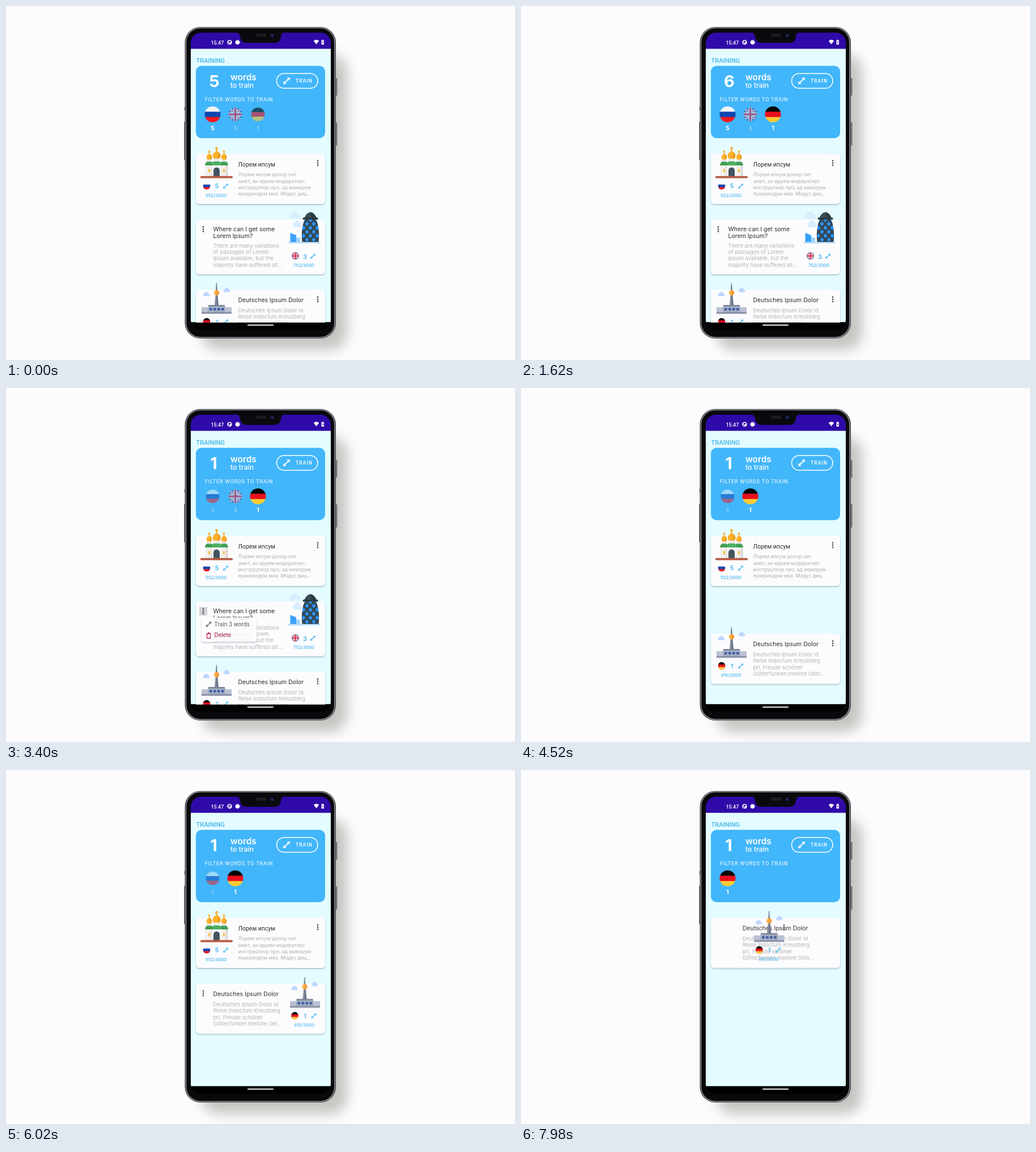
Animation of 898 by 624 pixels, one loop 8000 ms. Source, as an HTML page:

```html
<!DOCTYPE html>
<html lang="en">
<head>
<meta charset="utf-8">
<title>Training screen</title>
<style>
html, body { margin: 0; width: 100%; height: 100%; overflow: hidden; background: #fcfcfe; }
svg { display: block; width: 898px; height: 624px; }
text { font-family: Inter, sans-serif; }
.roboto { font-family: Roboto, sans-serif; }
.mid { text-anchor: middle; }
.title { font-size: 10.5px; fill: #2c2c32; }
.body { font-size: 9.5px; fill: #b2b2b6; }
.body.roboto { font-size: 9.2px; }
.accent { fill: #45b5ee; font-size: 7.8px; font-weight: 500; text-anchor: middle; }
.accent.count { font-size: 11px; font-weight: 600; }
.big { font-size: 29px; font-weight: 700; }
.pick { font-size: 10.5px; font-weight: 700; text-anchor: middle; }

/* One 8 s timeline drives every part */
.anim, .flip, .pick.ru, .pick.de { animation: 8s ease-in-out infinite; }
.pick.uk { transform: scale(.86); opacity: .6; font-weight: 400; }
.pick.ru { animation-name: unpick; }
.pick.de { animation-name: pick; }
.flip { animation-name: flip; }
.five { animation-name: five; animation-timing-function: step-end; }
.six { animation-name: six; animation-timing-function: step-end; }
.one { animation-name: one; animation-timing-function: step-end; }
.long { animation-name: long; animation-timing-function: step-end; }
.short { animation-name: short; animation-timing-function: step-end; }
.slot-ru { animation-name: slotRu; }
.slot-uk { animation-name: slotUk; }
.slot-de { animation-name: slotDe; }
.card-ru { animation-name: cardRu; }
.card-uk { animation-name: cardUk; }
.card-de { animation-name: cardDe; }
.menu-uk { animation-name: menuUk; }
.menu-ru { animation-name: menuRu; }
.press-uk { animation-name: pressUk; }
.press-ru { animation-name: pressRu; }

@keyframes pick {
  0%, 12.5% { transform: scale(.86); opacity: .6; font-weight: 400; }
  14.4%, 100% { transform: none; opacity: 1; font-weight: 700; }
}
@keyframes unpick {
  0%, 28.75% { transform: none; opacity: 1; font-weight: 700; }
  30.6%, 100% { transform: scale(.86); opacity: .52; font-weight: 400; }
}
@keyframes five { 0% { opacity: 1; } 12.5%, 100% { opacity: 0; } }
@keyframes six { 0% { opacity: 0; } 12.5% { opacity: 1; } 28.75%, 100% { opacity: 0; } }
@keyframes one { 0% { opacity: 0; } 28.75%, 100% { opacity: 1; } }
@keyframes long { 0% { opacity: 1; } 58.7% { opacity: 0; } 96.25%, 100% { opacity: 1; } }
@keyframes short { 0% { opacity: 0; } 58.7% { opacity: 1; } 96.25%, 100% { opacity: 0; } }
@keyframes slotRu { 0%, 89.8% { opacity: 1; } 91%, 100% { opacity: 0; } }
@keyframes slotUk { 0%, 51.4% { opacity: 1; } 53.2%, 100% { opacity: 0; } }
@keyframes slotDe {
  0%, 51.4% { transform: none; }
  55.1%, 88.94% { transform: translateX(-40px); }
  92.7%, 100% { transform: translateX(-80px); }
}
@keyframes cardRu { 0%, 90.9% { opacity: 1; } 92.4%, 100% { opacity: 0; } }
@keyframes cardUk { 0%, 53.3% { opacity: 1; } 54.8%, 100% { opacity: 0; } }
@keyframes cardDe {
  0%, 54.86% { transform: none; }
  58.01%, 92.4% { transform: translateY(-123.5px); }
  95.5%, 100% { transform: translateY(-239.5px); }
}
@keyframes flip {
  0%, 58.7% { transform: none; }
  64.95% { transform: translateX(var(--dx)); }
  96.25% { transform: translateX(var(--dx)); animation-timing-function: cubic-bezier(.42, 0, .8, .8); }
  100% { transform: translateX(calc(var(--dx) * .38)); }
}
@keyframes menuUk { 0%, 41.56% { opacity: 0; } 42.81%, 50.69% { opacity: 1; } 52.44%, 100% { opacity: 0; } }
@keyframes menuRu { 0%, 79.4% { opacity: 0; } 80.6%, 88.25% { opacity: 1; } 90%, 100% { opacity: 0; } }
@keyframes pressUk { 0%, 41% { opacity: 0; } 41.6%, 43.5% { opacity: 1; } 45.5%, 100% { opacity: 0; } }
@keyframes pressRu { 0%, 78.8% { opacity: 0; } 79.4%, 81.3% { opacity: 1; } 83.3%, 100% { opacity: 0; } }
</style>
</head>
<body>
<svg viewBox="0 0 898 624">
<defs>
  <filter id="blur" x="-30%" y="-30%" width="160%" height="160%"><feGaussianBlur stdDeviation="11"/></filter>
  <filter id="lift" x="-10%" y="-20%" width="120%" height="150%">
    <feDropShadow dx="0" dy="1.4" stdDeviation="1.3" flood-color="#44606e" flood-opacity=".45"/>
  </filter>
  <clipPath id="round"><circle r="14"/></clipPath>
  <clipPath id="glass"><rect x="326" y="47" width="247" height="524" rx="18"/></clipPath>
  <clipPath id="list"><rect x="326" y="75" width="247" height="482.5"/></clipPath>
  <pattern id="lattice" x="531" y="377" width="12" height="14" patternUnits="userSpaceOnUse">
    <rect width="12" height="14" fill="#2a93f6"/>
    <path d="M-2-2.300 14 16.300M14-2.300-2 16.300" stroke="#34454f" stroke-width="3.600"/>
  </pattern>

  <g id="ru" clip-path="url(#round)">
    <path d="M-14-14h28v28h-28z" fill="#f5f5f8"/>
    <path d="M-14-4.7h28V14h-28z" fill="#0d47b0"/><path d="M-14 4.7h28V14h-28z" fill="#f01b20"/>
  </g>
  <g id="de" clip-path="url(#round)">
    <path d="M-14-14h28v28h-28z" fill="#050505"/>
    <path d="M-14-4.7h28V14h-28z" fill="#e8101c"/><path d="M-14 4.7h28V14h-28z" fill="#ffcb32"/>
  </g>
  <g id="uk" clip-path="url(#round)">
    <path d="M-14-14h28v28h-28z" fill="#173a8c"/>
    <path d="M-14-14 14 14M14-14-14 14" stroke="#f4f4f8" stroke-width="5"/>
    <path d="M-14-14 14 14M14-14-14 14" stroke="#d8203c" stroke-width="1.8"/>
    <path d="M0-14V14M-14 0H14" stroke="#f4f4f8" stroke-width="8"/>
    <path d="M0-14V14M-14 0H14" stroke="#d8203c" stroke-width="4.2"/>
  </g>
  <g id="arrows" fill="none" stroke="currentColor" stroke-width="1.5">
    <path d="M-4.5 4.5 4.5-4.5M1-5H5V-1M-5 1V5H-1M-2.600.600-.600 2.600M.600-2.600 2.600-.600"/>
  </g>
  <g id="dots" fill="#55555a"><circle r="1.4" cy="-4"/><circle r="1.4"/><circle r="1.4" cy="4"/></g>
  <path id="cloud" d="M-4 3a2.6 2.6 0 0 1 0-5 4 4 0 0 1 7.4 0A2.6 2.6 0 0 1 4 3Z"/>
  <g id="dome">
    <path d="M0-8V-1M-2.2-6H2.2M-1.4-4H1.4" stroke="#f5a51d" stroke-width="1.3"/>
    <path d="M0-3C1 0 5.3 1 5.3 5.5 5.3 8 4 10 3 10H-3C-4 10-5.3 8-5.3 5.5-5.3 1-1 0 0-3Z" fill="#fdb22b"/>
    <path d="M0-3C1 0 5.3 1 5.3 5.5 5.3 8 4 10 3 10H1C3 7 3 1 0-3Z" fill="#ee9a19"/>
  </g>
  <g id="sidetower">
    <path d="M-4 270h8v6h-8z" fill="#e6e5e4"/>
    <path d="M-7 280h14v20H-7z" fill="#f1f0ee"/><path d="M3 280h4v20H3z" fill="#dcdad8"/>
    <path d="M-7.500 281C-7 277-5 274.500-3.500 274.500H3.500C5 274.500 7 277 7.500 281Z" fill="#3f9f55"/>
    <rect x="-1.600" y="287" width="3.200" height="6.500" rx="1.500" fill="#fbc04b"/>
    <use href="#dome" transform="translate(0 261.500) scale(.9)"/>
  </g>
  <g id="menu">
    <rect width="97" height="43" rx="4" fill="#fcfcfe" filter="url(#lift)"/>
    <use href="#arrows" transform="translate(12.500 12) scale(.8)" color="#55555a"/>
    <g fill="none" stroke="#b3123c" stroke-width="1.300"><path d="M8.500 28.500h8M11 27h3M9.500 29v7.500h6V29"/></g>
    <text x="22.500" y="34.500" font-size="9.700" font-weight="500" fill="#a3173c">Delete</text>
  </g>
</defs>

<rect width="898" height="624" fill="#fcfcfe"/>

<!-- Phone -->
<rect x="345" y="86" width="257" height="520" rx="30" fill="#77776c" opacity=".42" filter="url(#blur)"/>
<g fill="#77777c">
  <rect x="314.500" y="178" width="2" height="6" rx="1"/><rect x="314" y="204" width="2.500" height="68" rx="1"/>
  <rect x="581" y="127" width="3.500" height="31" rx="1"/><rect x="581" y="205" width="3.500" height="41" rx="1"/>
</g>
<rect x="315.500" y="37" width="266.500" height="549" rx="27" fill="#4a4a4f"/>
<rect x="317.700" y="38.700" width="262" height="545.500" rx="25.500" fill="#09090b" stroke="#9a9aa0" stroke-width="1.200"/>
<g clip-path="url(#glass)">
  <path d="M326 47h247v29H326z" fill="#300aa8"/>
  <path d="M326 75.500h247v482H326z" fill="#e4fcff"/>
  <path d="M326 557.500h247V572H326z" fill="#000"/>
</g>
<path d="M402 46C410 46 412 49 413 54 414 62 418 65 426 65H472C480 65 484 62 485 54 486 49 488 46 496 46Z" fill="#0a0a0e"/>
<rect x="441" y="49" width="18" height="5" rx="2" fill="#1c1c22"/>
<circle cx="469.500" cy="52" r="3.200" fill="#141a3c"/><circle cx="469.500" cy="52" r="1.200" fill="#33469a"/>
<rect x="426" y="561.500" width="46" height="2" rx="1" fill="#f6f6f8"/>

<!-- Status bar -->
<g fill="#fff">
  <text class="roboto" x="361.500" y="67.500" font-size="9" font-weight="500">15:47</text>
  <circle cx="394.500" cy="64" r="4.200"/><path d="M394 61.500h2.500v2.500H394v3h-1.300v-5.500z" fill="#300aa8"/>
  <circle cx="408.500" cy="64" r="3.500"/><circle cx="408.500" cy="64" r="4" fill="none" stroke="#fff" stroke-dasharray="1.200 1"/>
  <path d="M542.800 61.500Q547.500 57.700 552.200 61.500L547.500 67.500Z"/>
  <path d="M556.500 60.500h1v-1h2v1h1.500v7.500h-4.500z"/><path d="M559 61.500 557.700 64.500H559V66.800L560.200 63.800H559Z" fill="#300aa8"/>
</g>

<!-- Training panel -->
<text class="roboto" x="335.500" y="100" font-size="11.100" font-weight="500" fill="#42b5ea">TRAINING</text>
<rect x="335" y="105.500" width="228" height="127.500" rx="10" fill="#42b6fa"/>
<g fill="#fff">
  <g class="big mid">
    <text class="anim five" x="367.500" y="142.500">5</text>
    <text class="anim six" x="367.500" y="142.500">6</text>
    <text class="anim one" x="366.500" y="142.500">1</text>
  </g>
  <text x="396" y="131" font-size="15.300" font-weight="600">words</text>
  <text x="396" y="144" font-size="12.300" font-weight="500">to train</text>
  <rect x="477.500" y="119" width="72.500" height="26" rx="13" fill="none" stroke="#fff" stroke-width="1.500"/>
  <use href="#arrows" x="495" y="132" color="#fff"/>
  <text class="roboto" x="511" y="135.200" font-size="8.600" font-weight="500" letter-spacing="1">TRAIN</text>
  <text class="roboto" x="351" y="167.800" font-size="9" letter-spacing=".9">FILTER WORDS TO TRAIN</text>

  <g class="anim slot-ru">
    <g transform="translate(364.500 191)"><use class="pick ru" href="#ru"/></g>
    <g transform="translate(364.500 215.500)"><text class="pick ru" y="3.800">5</text></g>
  </g>
  <g class="anim slot-uk">
    <g transform="translate(404.500 191)"><use class="pick uk" href="#uk"/></g>
    <g transform="translate(404.500 215.500)"><text class="pick uk" y="3.800">3</text></g>
  </g>
  <g class="anim slot-de">
    <g transform="translate(444.500 191)"><use class="pick de" href="#de"/></g>
    <g transform="translate(444.500 215.500)"><text class="pick de" y="3.800">1</text></g>
  </g>
</g>

<!-- Cards -->
<g clip-path="url(#list)">
  <g class="anim card-ru">
    <rect x="335" y="260.500" width="228" height="88.500" rx="6" fill="#fcfcfe" filter="url(#lift)"/>
    <use href="#sidetower" x="358.500"/><use href="#sidetower" x="384.500"/>
    <path d="M363 280h17v20h-17z" fill="#f8f7f5"/><path d="M366 267h11v8h-11z" fill="#eceae8"/>
    <path d="M363 281C363.500 277 365 274 366 274H377C378 274 379.500 277 380 281Z" fill="#4cb063"/>
    <path d="M366 300v-10a5.500 5.500 0 0 1 11 0v10z" fill="#43545f"/>
    <use href="#dome" transform="translate(371.500 257.500) scale(1.300 1.150)"/>
    <rect x="343" y="299.700" width="57" height="3.800" rx="1.500" fill="#b65b42"/>
    <use href="#ru" transform="translate(354 317) scale(.46)"/>
    <text class="accent count" x="372" y="321">5</text>
    <use href="#arrows" transform="translate(387.500 317.500) scale(.75)" color="#45b5ee"/>
    <text class="accent" x="370.500" y="336.600">552/3000</text>
    <text class="title roboto" x="409.500" y="282.500">Лорем ипсум</text>
    <text class="body roboto" y="300.200">
      <tspan x="409.500">Лорем ипсум долор сит</tspan><tspan x="409.500" dy="11.400">амет, ан еррем модератиус</tspan>
      <tspan x="409.500" dy="11.400">инструцтиор про, ад маиорум</tspan><tspan x="409.500" dy="11.400">яуаерендум меа. Модус диц…</tspan>
    </text>
    <rect class="anim press-ru" x="543" y="269.500" width="14" height="15" fill="#d4d4d8"/>
    <use href="#dots" x="550" y="277"/>
  </g>

  <g class="anim card-uk">
    <rect x="335" y="376.500" width="228" height="96.500" rx="6" fill="#fcfcfe" filter="url(#lift)"/>
    <g fill="#d8eeff">
      <use href="#cloud" transform="translate(510 370) scale(1.700)"/><use href="#cloud" transform="translate(514 385.500) scale(1.400 1.700)"/>
      <rect x="498" y="415.500" width="57" height="3" rx="1.500" fill="#b9def9"/>
    </g>
    <path d="M501.500 400 512 404V416H501.500Z" fill="#3ba2fa"/><path d="M512 408h7v8h-7z" fill="#a6d4fb"/>
    <path d="M522.500 416C520.500 400 523 385 527 376H547C551 385 553.500 400 551.500 416Z" fill="url(#lattice)"/>
    <path d="M526 374C529 367 533 363.500 537 363.500S545 367 548 374Z" fill="#3b4c56"/>
    <path d="M537 363.500C541 363.500 545 367 548 374H540Z" fill="#2b3941"/>
    <rect x="523.500" y="373" width="27" height="3.500" rx="1.500" fill="#2b3941"/>
    <use href="#uk" transform="translate(510.500 440.500) scale(.46)"/>
    <text class="accent count" x="527.500" y="445.500">3</text>
    <use href="#arrows" transform="translate(541.500 441) scale(.75)" color="#45b5ee"/>
    <text class="accent" x="525.500" y="460">752/3000</text>
    <text class="title" y="397"><tspan x="365.500">Where can I get some</tspan><tspan x="365.500" dy="12.300">Lorem Ipsum?</tspan></text>
    <text class="body" y="425.600">
      <tspan x="365.500">There are many variations</tspan><tspan x="365.500" dy="11.400">of passages of Lorem</tspan>
      <tspan x="365.500" dy="11.400">Ipsum available, but the</tspan><tspan x="365.500" dy="11.400">majority have suffered alt…</tspan>
    </text>
    <rect class="anim press-uk" x="341" y="386" width="14" height="15" fill="#d4d4d8"/>
    <use href="#dots" x="348" y="393.500"/>
  </g>

  <g class="anim card-de">
    <rect x="335" y="500" width="228" height="88.500" rx="6" fill="#fcfcfe" filter="url(#lift)"/>
    <g class="flip" style="--dx:-44px">
      <text class="title" x="409.500" y="522">Deutsches Ipsum Dolor</text>
      <text class="body" y="540">
        <tspan x="409.500">Deutsches Ipsum Dolor id</tspan><tspan x="409.500" dy="11.400">Reise indoctum Kreuzberg</tspan>
        <tspan x="409.500" dy="11.400">pri, Freude schöner</tspan>
      </text>
      <text class="body anim long" x="409.500" y="574.200">Götterfunken meliore Okto…</text>
      <text class="body anim short" x="409.500" y="574.200">Götterfunken meliore Okt…</text>
    </g>
    <g class="flip" style="--dx:155.5px">
      <g fill="#bdd6ff"><use href="#cloud" x="353.500" y="508.500"/><use href="#cloud" x="389.500" y="501.500"/></g>
      <path d="M370.900 488h1l.8 13h-2.600z" fill="#687083"/>
      <path d="M369.700 508h3.400L375 529h-7.200z" fill="#858da0"/><path d="M371.400 508h1.700L375 529h-3.600z" fill="#6a7287"/>
      <circle cx="371.400" cy="505.500" r="4.700" fill="#ffb254"/><path d="M371.400 500.800a4.700 4.700 0 0 1 0 9.400Z" fill="#f49a36"/>
      <path d="M357 527h29v4h-29z" fill="#7b8398"/><path d="M345 531h53v10h-53z" fill="#bac1d2"/>
      <path d="M356 529.500h31V540h-31z" fill="#a7afc4"/>
      <path d="M359 532.500h4.500v4H359zM366 532.500h4.500v4H366zM373 532.500h4.500v4H373zM380 532.500h4.500v4H380z" fill="#3156a5"/>
      <path d="M345 539.500h53v3h-53z" fill="#858da2"/>
      <use href="#de" transform="translate(354 556.500) scale(.46)"/>
      <text class="accent count" x="372" y="560.800">1</text>
      <use href="#arrows" transform="translate(387.500 557) scale(.75)" color="#45b5ee"/>
      <text class="accent" x="370.500" y="576.200">410/3000</text>
    </g>
    <g class="flip" style="--dx:-202px"><use href="#dots" x="550" y="517"/></g>
  </g>

  <!-- Menus -->
  <g class="anim menu-uk">
    <g transform="translate(345 404.500)"><use href="#menu"/><text x="22.500" y="15.300" font-size="9.700" fill="#3c3c42">Train 3 words</text></g>
  </g>
  <g class="anim menu-ru">
    <g transform="translate(456 288)"><use href="#menu"/><text x="22.500" y="15.300" font-size="9.700" fill="#3c3c42">Train 5 words</text></g>
  </g>
</g>
</svg>
</body>
</html>
```
